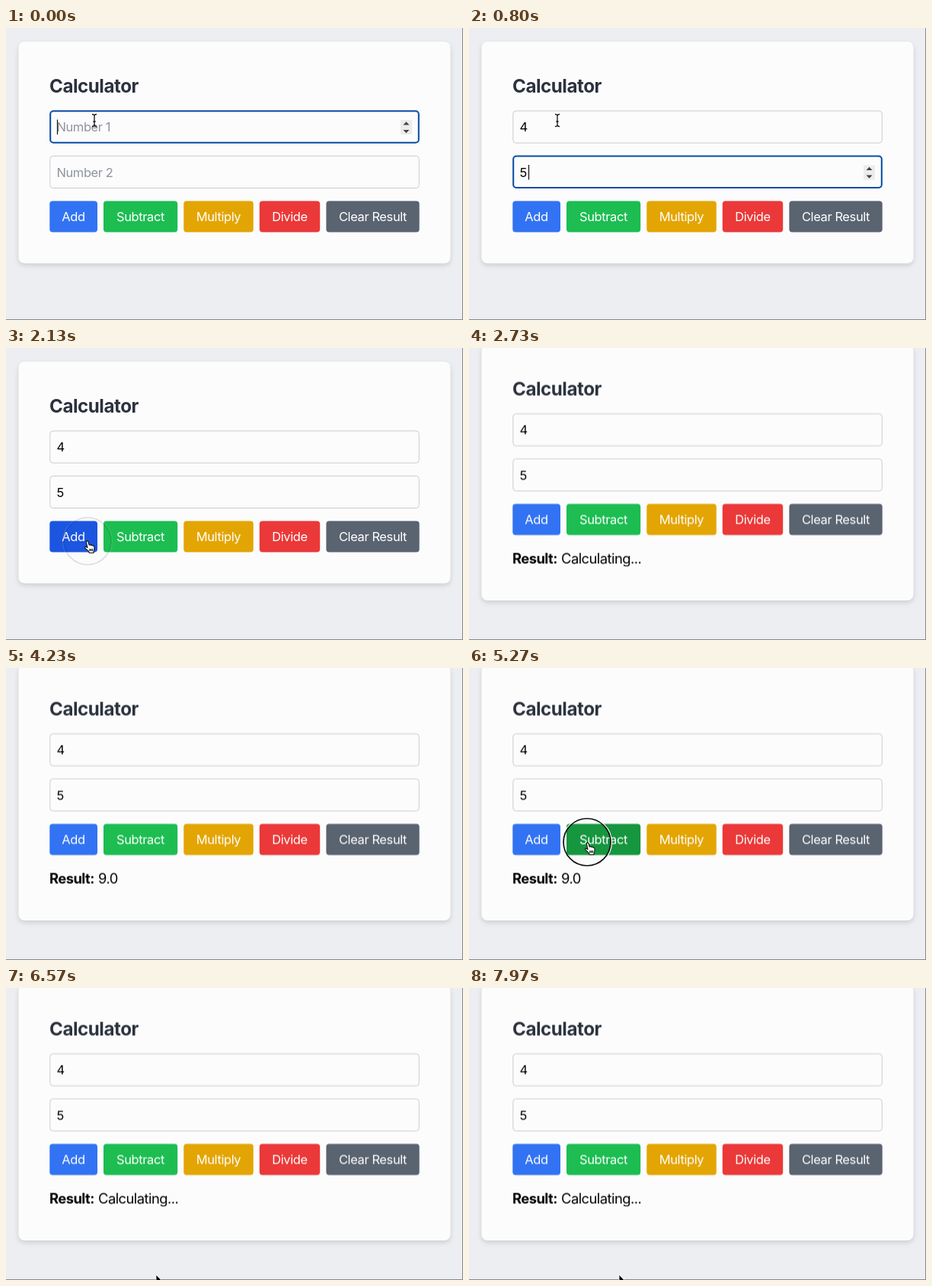
An HTML page that plays this animation: 600 px wide and 384 px high, repeating every 8000 ms.

```html
<!DOCTYPE html>
<html lang="en">
<head>
<meta charset="utf-8">
<title>Calculator</title>
<style>
html, body { margin: 0; width: 100%; height: 100%; overflow: hidden; background: #eceef2; }
svg { display: block; width: 600px; height: 384px; font-family: Inter, "Open Sans", sans-serif; }
text { font-size: 16.5px; letter-spacing: -.025em; }
.title { font-size: 24.2px; font-weight: 700; fill: #2b323e; letter-spacing: -.02em; }
.hint { fill: #8f949d; }
.label text { fill: #fff; text-anchor: middle; }
.result text { font-size: 18.4px; letter-spacing: -.03em; }
.result .bold { font-weight: 700; }
.field { fill: #fcfcfc; stroke: #cbccd0; }
.focus rect.ring { fill: none; stroke: #0b4ea6; stroke-width: 2; }
.caret { stroke: #111; stroke-width: 1.2; }
.card { fill: #fcfcfc; filter: drop-shadow(0 3px 3px rgba(0, 0, 0, .13)); }
.click circle { fill: none; }

/* One loop is 8 s: 1% = 80 ms */
.step { animation: 8s step-end infinite; }
.hint1  { animation-name: hint1; }
.value1 { animation-name: value1; }
.hint2  { animation-name: hint2; }
.value2 { animation-name: value2; }
.focus1 { animation-name: focus1; }
.focus2 { animation-name: focus2; }
.short  { animation-name: short; }
.tall   { animation-name: tall; }
.body   { animation-name: body; }
.busy   { animation-name: busy; }
.answer { animation-name: answer; }
.add    { animation-name: add; }
.sub    { animation-name: sub; }
.beam   { animation-name: beam; }
.hand   { animation-name: hand; }
.arrow  { animation-name: arrow; }
.caret1 { animation-name: caret1; }
.caret2 { animation-name: caret2; }
@keyframes hint1  { 0% { opacity: 1 } 3.125%, 100% { opacity: 0 } }
@keyframes value1 { 0% { opacity: 0 } 3.125%, 100% { opacity: 1 } }
@keyframes hint2  { 0% { opacity: 1 } 9.75%, 100% { opacity: 0 } }
@keyframes value2 { 0% { opacity: 0 } 9.75%, 100% { opacity: 1 } }
@keyframes focus1 { 0% { opacity: 1 } 6.25%, 100% { opacity: 0 } }
@keyframes focus2 { 0% { opacity: 0 } 6.25% { opacity: 1 } 21.5%, 100% { opacity: 0 } }
@keyframes caret1 { 0% { transform: none } 3.125%, 100% { transform: translateX(11px) } }
@keyframes caret2 { 0% { transform: none; opacity: 1 } 9.75% { transform: translateX(11px); opacity: 1 } 17.5%, 100% { opacity: 0 } }
@keyframes short  { 0% { opacity: 1 } 27.875%, 100% { opacity: 0 } }
@keyframes tall   { 0% { opacity: 0 } 27.875%, 100% { opacity: 1 } }
@keyframes body   { 0% { transform: none } 27.875%, 100% { transform: translateY(-22.5px) } }
@keyframes busy   { 0% { opacity: 0 } 27.875% { opacity: 1 } 48.75% { opacity: 0 } 68.125%, 100% { opacity: 1 } }
@keyframes answer { 0% { opacity: 0 } 48.75% { opacity: 1 } 68.125%, 100% { opacity: 0 } }
@keyframes add    { 0% { fill: #3273f3 } 13.25% { fill: #1c55e0 } 27.875%, 100% { fill: #3273f3 } }
@keyframes sub    { 0% { fill: #1dbd52 } 60.4% { fill: #16963f } 70.1%, 100% { fill: #1dbd52 } }
@keyframes beam   { 0% { opacity: 1 } 13.25%, 100% { opacity: 0 } }
@keyframes hand   { 0% { opacity: 0 } 13.25% { opacity: 1 } 27.875% { opacity: 0 } 60.4% { opacity: 1 } 70.1%, 100% { opacity: 0 } }
@keyframes arrow  { 0% { opacity: 0 } 27.875% { opacity: 1 } 60.4% { opacity: 0 } 70.1%, 100% { opacity: 1 } }

.pointer { animation: move 8s ease-in-out infinite; }
@keyframes move {
  0%, 10.875% { transform: translate(116px, 121px) }
  14.375%, 29.375% { transform: translate(105px, 253px) }
  32.5% { transform: translate(112px, 400px); animation-timing-function: step-end }
  57% { transform: translate(140px, 400px); animation-timing-function: ease-out }
  61.875%, 68.75% { transform: translate(154px, 229px) }
  75%, 100% { transform: translate(197px, 377px) }
}
.click { animation: click 8s linear infinite; }
@keyframes click {
  0%, 21.24% { opacity: 0; transform: translate(107px, 254px) scale(.5) }
  21.25% { opacity: 1; transform: translate(107px, 254px) scale(.5) }
  22.5%, 25% { opacity: 1; transform: translate(107px, 254px) }
  26.875% { opacity: 0; transform: translate(107px, 254px) }
  26.9%, 63.74% { opacity: 0; transform: translate(155px, 229px) scale(.5) }
  63.75% { opacity: 1; transform: translate(155px, 229px) scale(.5) }
  65%, 66.5% { opacity: 1; transform: translate(155px, 229px) }
  67.75%, 100% { opacity: 0; transform: translate(155px, 229px) }
}
</style>
</head>
<body>
<svg viewBox="0 0 600 384">
  <defs>
    <g id="spinner">
      <rect x="518" y="121" width="15" height="19" fill="#ececec"/>
      <path d="M521.5 127.5l4-4.3 4 4.3zM521.5 134l4 4.3 4-4.3z" fill="#444"/>
    </g>
  </defs>
  <rect width="600" height="384" fill="#eceef2"/>
  <rect class="card step short" x="16.5" y="18" width="567" height="291.5" rx="8"/>
  <rect class="card step tall" x="16.5" y="-4.5" width="567" height="336.5" rx="8"/>

  <g class="step body">
    <text class="title" x="57" y="84.7">Calculator</text>
    <rect class="field" x="57.8" y="109" width="484.5" height="42.2" rx="4"/>
    <rect class="field" x="57.8" y="168.3" width="484.5" height="42.2" rx="4"/>

    <g class="focus step focus1">
      <rect class="ring" x="58.2" y="109.3" width="483.6" height="41.4" rx="4"/>
      <use href="#spinner"/>
      <path class="caret step caret1" d="M67.5 120.5v19.5"/>
    </g>
    <g class="focus step focus2">
      <rect class="ring" x="58.2" y="168.6" width="483.6" height="41.4" rx="4"/>
      <use href="#spinner" y="59.5"/>
      <path class="caret step caret2" d="M67.5 180v19.5"/>
    </g>

    <text class="hint step hint1" x="66.5" y="136.3">Number 1</text>
    <text class="step value1" x="66.5" y="136.3">4</text>
    <text class="hint step hint2" x="66.5" y="195.8">Number 2</text>
    <text class="step value2" x="66.5" y="195.8">5</text>

    <rect class="step add" x="57.3" y="227.5" width="62.7" height="41" rx="4"/>
    <rect class="step sub" x="128" y="227.5" width="97.2" height="41" rx="4"/>
    <rect x="233.3" y="227.5" width="91.5" height="41" rx="4" fill="#e3a503"/>
    <rect x="332.8" y="227.5" width="79.4" height="41" rx="4" fill="#eb3839"/>
    <rect x="420.4" y="227.5" width="122.3" height="41" rx="4" fill="#5a6370"/>
    <g class="label">
      <text x="88.5" y="254.3">Add</text>
      <text x="176.5" y="254.3">Subtract</text>
      <text x="279" y="254.3">Multiply</text>
      <text x="372.5" y="254.3">Divide</text>
      <text x="481.5" y="254.3">Clear Result</text>
    </g>

    <g class="result step tall">
      <text class="bold" x="57" y="306">Result:</text>
      <text class="step busy" x="121" y="306">Calculating...</text>
      <text class="step answer" x="121" y="306">9.0</text>
    </g>
  </g>

  <path d="M599.5 0V384M0 383.5H600" stroke="#85878b"/>

  <g class="click">
    <circle r="32.2" stroke="#fff" stroke-width="1.6"/>
    <circle r="31" stroke="#111" stroke-width="1.7"/>
  </g>
  <g class="pointer">
    <path class="step beam" d="M-3 -7.5Q0 -7.5 0 -5.5Q0 -7.5 3 -7.5M0 -6V7M-3 8.5Q0 8.5 0 6.5Q0 8.5 3 8.5M-1.6 2H1.6" fill="none" stroke="#111" stroke-width="1.3"/>
    <path class="step hand" d="M.2 1.6Q1.5 -.4 2.8 1.6L4.2 6.2Q5.6 5 6.6 6.5Q8 5.6 8.9 7.1Q10.6 6.6 10.9 8.6Q11.4 11.5 10 14.2V16.5H4.3L3.3 14.2L-.9 10.3Q-2 8.6 -.2 8.3L2 9.6ZM4.8 11v3.2M6.6 11v3.2M8.4 11v3.2" fill="#fff" stroke="#111" stroke-width="1.1" stroke-linejoin="round"/>
    <path class="step arrow" d="M0 0V15.5L3.5 12.2L5.8 17.4L8.2 16.3L6 11.3H10.8Z" fill="#000" stroke="#fff" stroke-width=".8"/>
  </g>
</svg>
</body>
</html>
```
